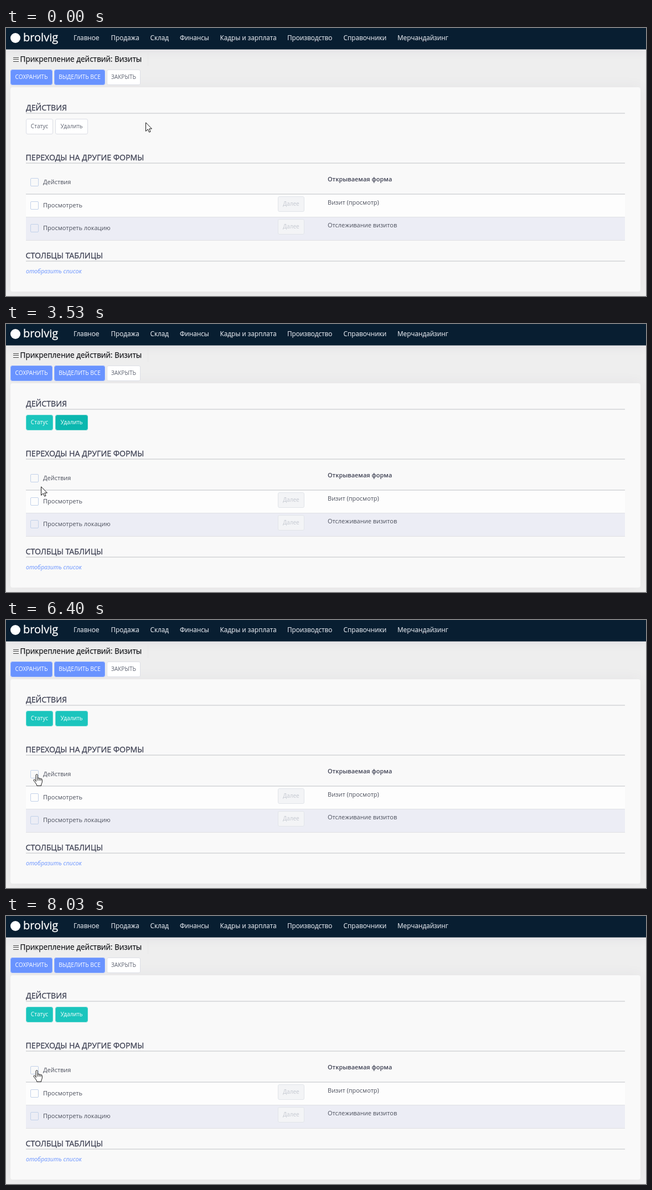
An HTML page that plays this animation: 1156x484 px, repeating every 8260 ms.

```html
<!DOCTYPE html>
<html lang="ru">
<head>
<meta charset="utf-8">
<title>Прикрепление действий</title>
<style>
:root { --loop: 8260ms; --teal: #1bc5bd; --deep: #0bb7af; --blue: #6993ff; }
html, body { margin: 0; width: 100%; height: 100%; overflow: hidden; background: #eee; }
#stage {
  position: relative; width: 1156px; height: 484px; overflow: hidden;
  font: 11px/20px "Open Sans", "Noto Sans", sans-serif; color: #4b4f5c; white-space: nowrap;
}
#stage * { position: absolute; box-sizing: border-box; left: var(--x); top: var(--y); }

.bar {
  left: 0; top: 0; width: 1156px; height: 39px; background: #081e31;
  border-bottom: 1px solid #55636f; box-shadow: 0 0 20px rgba(82, 63, 105, .1);
}
.mark { width: 18px; height: 18px; border-radius: 50%; background: #fff; }
.brand { font-size: 20px; color: #fff; -webkit-text-stroke: .3px; }
.nav { top: 7px !important; font-size: 11.75px; color: #dfe3ea; -webkit-text-stroke: .15px; }
.menu { width: 10px; height: 8px; border: solid #444; border-width: 1.4px 0; }
.menu::after { content: ""; position: absolute; left: 0; top: 2px; width: 10px; height: 1.4px; background: #444; }
.title { font-size: 13.55px; color: #17181c; -webkit-text-stroke: .25px; }
.split { width: 1px; height: 24px; background: #e8e8e8; }
.card {
  width: 1138px; height: 369px; border-radius: 4px; background: #f9f9f9;
  box-shadow: 0 0 25px rgba(82, 63, 105, .06);
}
h2 {
  margin: 0; font-size: 14.15px; font-weight: 400; line-height: 19px;
  color: #3f4254; -webkit-text-stroke: .3px;
}
.th { font-size: 10.95px; font-weight: 600; color: #3f4254; }
.link { font-size: 10.7px; font-style: italic; color: var(--blue); }
.line { left: 36px !important; width: 1082px; height: 1px; background: #dfe0e4; }
.thick { height: 2px; background: #dcdddf; }
.row { left: 36px !important; width: 1082px; height: 41px; }

.btn {
  width: var(--w); height: 28px; border: 1px solid #dcdee5; border-radius: 3px;
  background: #fff; color: #5d6270; font-size: 10.1px; line-height: 25px; text-align: center;
}
.main { border-color: #8cacff; background: var(--blue) padding-box; color: #fff; }
.off { border-color: #e1e4e9; background: #f3f4f6; color: #c4c8d0; }
.on { border-color: #55d3cd; background: var(--teal) padding-box; color: #fff; }
.box, .tick { width: 15px; height: 15px; border-radius: 2px; }
.box { border: 1px solid #c2d1e9; }
.tick { background: #5885e0; }
.tick::after {
  content: ""; position: absolute; left: 5px; top: 2px; width: 5px; height: 8px;
  box-sizing: border-box; border: solid #fff; border-width: 0 2px 2px 0; transform: rotate(45deg);
}

.status { background-clip: padding-box; animation: status var(--loop) infinite; }
.remove { background-clip: padding-box; animation: remove var(--loop) infinite; }
.one { opacity: 0; animation: one var(--loop) linear infinite; }
.all { opacity: 0; animation: all var(--loop) linear infinite; }
.swap { opacity: 0; animation: swap var(--loop) step-end infinite; }
.close { animation: nudge var(--loop) step-end infinite; }
.row1 { background: #fdfdfd; animation: row1 var(--loop) step-end infinite; }
.row2 { background: #ecedf5; }
.green { background: #dff0d8; }
#cursor { left: 0; top: 0; width: 0; height: 0; animation: move var(--loop) infinite; }
#cursor svg { width: 20px; height: 24px; overflow: visible; stroke: #111; fill: #fff; stroke-linejoin: round; }
.arrow { animation: arrow var(--loop) step-end infinite; }
.hand { animation: hand var(--loop) step-end infinite; }

@keyframes status {
  0%, 13.6% { background-color: #fff; color: #5d6270; border-color: #dcdee5; }
  14.9%, 18.1% { background-color: #f3f6f9; color: var(--blue); border-color: #d6dae5; }
  20%, 31.1% { background-color: var(--deep); color: #fff; border-color: #4bc9c3; }
  32.9%, 100% { background-color: var(--teal); color: #fff; border-color: #55d3cd; }
}
@keyframes remove {
  0%, 22.2% { background-color: #fff; color: #5d6270; border-color: #dcdee5; }
  24%, 31.1% { background-color: #f3f6f9; color: var(--blue); border-color: #d6dae5; }
  32.9%, 53.2% { background-color: var(--deep); color: #fff; border-color: #4bc9c3; }
  55.1%, 100% { background-color: var(--teal); color: #fff; border-color: #55d3cd; }
}
@keyframes one {
  0%, 53.2% { opacity: 0; }
  55.5%, 70.5% { opacity: 1; }
  72.6%, 80.2% { opacity: 0; }
  82.2%, 95.6% { opacity: 1; }
  97.2%, 100% { opacity: 0; }
}
@keyframes all {
  0%, 80.2% { opacity: 0; }
  82.2%, 95.6% { opacity: 1; }
  97.2%, 100% { opacity: 0; }
}
@keyframes swap {
  0% { opacity: 0; }
  80.5% { opacity: 1; }
  95.8%, 100% { opacity: 0; }
}
@keyframes nudge {
  0% { transform: none; }
  80.5% { transform: translateX(1px); }
  95.8%, 100% { transform: none; }
}
@keyframes row1 {
  0% { background: #fdfdfd; }
  45.8% { background: #f0f0f0; }
  75%, 100% { background: #fdfdfd; }
}
@keyframes move {
  0%, 4% { transform: translate(252px, 170px); animation-timing-function: ease-in; }
  8.5% { transform: translate(150px, 151px); animation-timing-function: ease-out; }
  13.7%, 18.9% { transform: translate(60px, 173px); animation-timing-function: ease-in-out; }
  25.7%, 32% { transform: translate(121px, 178px); animation-timing-function: ease-in-out; }
  40.8% { transform: translate(66px, 282px); animation-timing-function: linear; }
  42.7%, 43.5% { transform: translate(63px, 293px); animation-timing-function: ease-in-out; }
  50%, 58.4% { transform: translate(54px, 314px); }
  58.5%, 60.1% { transform: translate(55px, 314px); animation-timing-function: ease-in; }
  60.9% { transform: translate(64px, 315px); animation-timing-function: ease-out; }
  62.5%, 62.7% { transform: translate(69px, 315px); animation-timing-function: ease-in-out; }
  65.4%, 72.2% { transform: translate(53px, 317px); animation-timing-function: ease-in-out; }
  77.4%, 100% { transform: translate(56px, 278px); }
}
@keyframes arrow {
  0% { opacity: 1; }
  11.2% { opacity: 0; }
  34.2% { opacity: 1; }
  48.4% { opacity: 0; }
  73.8% { opacity: 1; }
  75.8%, 100% { opacity: 0; }
}
@keyframes hand {
  0% { opacity: 0; }
  11.2% { opacity: 1; }
  34.2% { opacity: 0; }
  48.4% { opacity: 1; }
  73.8% { opacity: 0; }
  75.8%, 100% { opacity: 1; }
}
</style>
</head>
<body>
<div id="stage">
  <div class="bar"></div>
  <div class="mark" style="--x:8px;--y:9px"></div>
  <span class="brand" style="--x:31px;--y:7px">brolvig</span>
  <span class="nav" style="--x:122px">Главное</span>
  <span class="nav" style="--x:189.5px">Продажа</span>
  <span class="nav" style="--x:260.5px">Склад</span>
  <span class="nav" style="--x:314px">Финансы</span>
  <span class="nav" style="--x:386.5px">Кадры и зарплата</span>
  <span class="nav" style="--x:508px">Производство</span>
  <span class="nav" style="--x:609.5px">Справочники</span>
  <span class="nav" style="--x:707px">Мерчандайзинг</span>

  <div class="menu" style="--x:13px;--y:53px"></div>
  <span class="title" style="--x:25.5px;--y:46px">Прикрепление действий: Визиты</span>
  <div class="split" style="--x:256px;--y:45px"></div>

  <div class="card" style="--x:8px;--y:107px"></div>
  <div class="btn main" style="--x:8px;--y:75px;--w:76px">СОХРАНИТЬ</div>
  <div class="btn main" style="--x:87px;--y:75px;--w:92px">ВЫДЕЛИТЬ ВСЕ</div>
  <div class="btn main swap" style="--x:87px;--y:75px;--w:93px">ОТМЕНИТЬ ВСЕ</div>
  <div class="btn close" style="--x:182px;--y:75px;--w:61px">ЗАКРЫТЬ</div>

  <h2 style="--x:36px;--y:134px">ДЕЙСТВИЯ</h2>
  <div class="line thick" style="--y:153px"></div>
  <div class="btn status" style="--x:36px;--y:164px;--w:49px">Статус</div>
  <div class="btn remove" style="--x:89px;--y:164px;--w:59px">Удалить</div>

  <h2 style="--x:35.5px;--y:224px">ПЕРЕХОДЫ НА ДРУГИЕ ФОРМЫ</h2>
  <div class="line thick" style="--y:243px"></div>

  <div class="row row1" style="--y:301px"></div>
  <div class="row row2" style="--y:342px"></div>
  <div class="row green swap" style="--y:301px"></div>
  <div class="row green swap" style="--y:342px"></div>
  <div class="line thick" style="--y:299px"></div>
  <div class="line" style="--y:341px"></div>
  <div class="line" style="--y:383px"></div>

  <div class="box" style="--x:44px;--y:271px"></div>
  <div class="box" style="--x:44px;--y:313px"></div>
  <div class="box" style="--x:44px;--y:354px"></div>
  <div class="tick all" style="--x:44px;--y:271px"></div>
  <div class="tick one" style="--x:44px;--y:313px"></div>
  <div class="tick all" style="--x:44px;--y:354px"></div>

  <span style="--x:67px;--y:268px">Действия</span>
  <span style="--x:67px;--y:310px">Просмотреть</span>
  <span style="--x:67px;--y:351px">Просмотреть локацию</span>
  <span class="th" style="--x:581px;--y:263px">Открываемая форма</span>
  <span style="--x:581px;--y:305px">Визит (просмотр)</span>
  <span style="--x:581px;--y:346px">Отслеживание визитов</span>

  <div class="btn off" style="--x:491px;--y:304px;--w:48px">Далее</div>
  <div class="btn off" style="--x:491px;--y:345px;--w:48px">Далее</div>
  <div class="btn on one" style="--x:491px;--y:304px;--w:48px">Далее</div>
  <div class="btn on all" style="--x:491px;--y:345px;--w:48px">Далее</div>

  <h2 style="--x:35.5px;--y:401px">СТОЛБЦЫ ТАБЛИЦЫ</h2>
  <div class="line thick" style="--y:420px"></div>
  <span class="link" style="--x:36px;--y:429px">отобразить список</span>

  <div id="cursor">
    <svg class="arrow" style="--x:0;--y:0" viewBox="0 0 20 24">
      <path d="M.5 .8V16.4L4.2 12.9L6.6 18.2L9 17.2L6.7 12H11.4Z"/>
    </svg>
    <svg class="hand" style="--x:-6.6px;--y:-.5px" viewBox="0 0 20 24">
      <path d="M5 14V2.3a1.6 1.6 0 0 1 3.2 0V8c.2-1.2 2.9-1 2.9.6c.2-1.1 2.8-.8 2.8.7c.3-.8 2.4-.6 2.4 1V14.5c0 2-1.8 3-1.8 6.8H6.8C6.8 18.5 3.5 15.5 1.2 12.2c-1-1.6.8-2.8 2-1.6L5 12.6"/>
      <path fill="none" d="M8.2 8v4M11.1 8.6v3.4M13.9 9.3v2.9"/>
    </svg>
  </div>
</div>
</body>
</html>
```
